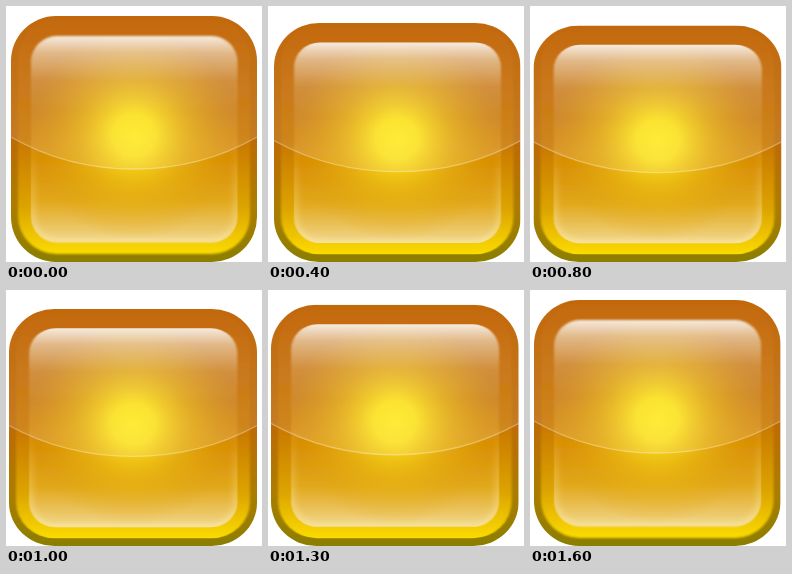
These frames come from a looping animation (256 px wide and 256 px high, 1700 ms). An HTML page:

```html
<!DOCTYPE html>
<html lang="en">
<head>
<meta charset="utf-8">
<title>Wobbling button</title>
<style>
  html, body { margin: 0; height: 100%; overflow: hidden; background: #fff; }
  svg { display: block; width: 100%; height: 100%; }
</style>
</head>
<body>
<svg viewBox="0 0 256 256">
  <defs>
    <linearGradient id="rim" x2="0" y2="1">
      <stop offset="0" stop-color="#c2680c"/>
      <stop offset=".5" stop-color="#bd6b06"/>
      <stop offset=".78" stop-color="#ab7d00"/>
      <stop offset="1" stop-color="#8b7e00"/>
    </linearGradient>
    <linearGradient id="bevel" x2="0" y2="1">
      <stop offset="0" stop-color="#c4690c"/>
      <stop offset=".5" stop-color="#c87604"/>
      <stop offset=".8" stop-color="#dca400"/>
      <stop offset="1" stop-color="#fbdb00"/>
    </linearGradient>
    <linearGradient id="panel" x2="0" y2="1">
      <stop offset="0" stop-color="#c4731a"/>
      <stop offset=".35" stop-color="#ca7c18"/>
      <stop offset=".6" stop-color="#d88e04"/>
      <stop offset=".8" stop-color="#e1a81c"/>
      <stop offset="1" stop-color="#f1d78c"/>
    </linearGradient>
    <radialGradient id="glow" gradientUnits="userSpaceOnUse" cx="128" cy="129" r="105">
      <stop offset="0" stop-color="#ffe820"/>
      <stop offset=".2" stop-color="#fbe01c"/>
      <stop offset=".55" stop-color="#ebba10" stop-opacity=".6"/>
      <stop offset="1" stop-color="#dfa008" stop-opacity="0"/>
    </radialGradient>
    <linearGradient id="shine" x2="0" y2="1">
      <stop offset="0" stop-color="#fff" stop-opacity=".85"/>
      <stop offset=".08" stop-color="#fff" stop-opacity=".48"/>
      <stop offset=".22" stop-color="#fff" stop-opacity=".12"/>
      <stop offset=".38" stop-color="#fff" stop-opacity="0"/>
    </linearGradient>
    <linearGradient id="gloss" x2="0" y2="1">
      <stop offset="0" stop-color="#fff" stop-opacity="0"/>
      <stop offset="1" stop-color="#fff" stop-opacity=".14"/>
    </linearGradient>
    <linearGradient id="edge" x2="0" y2="1">
      <stop offset=".5" stop-color="#ffe9a0" stop-opacity="0"/>
      <stop offset="1" stop-color="#ffefb0" stop-opacity=".5"/>
    </linearGradient>
    <filter id="soft"><feGaussianBlur stdDeviation=".8"/></filter>
    <filter id="softer"><feGaussianBlur stdDeviation="3"/></filter>
    <rect id="pane" x="25" y="30" width="206.5" height="206.5" rx="26"/>
    <clipPath id="body"><rect x="5" y="10" width="246" height="246" rx="45"/></clipPath>
    <clipPath id="inside"><use href="#pane"/></clipPath>
  </defs>
  <g id="button" clip-path="url(#body)">
    <rect x="5" y="10" width="246" height="246" fill="url(#rim)"/>
    <rect x="12" y="14" width="232" height="234" rx="38" fill="url(#bevel)" filter="url(#soft)"/>
    <use href="#pane" fill="url(#panel)" filter="url(#soft)"/>
    <g clip-path="url(#inside)">
      <use href="#pane" fill="url(#glow)"/>
      <use href="#pane" fill="none" stroke="url(#edge)" stroke-width="8" filter="url(#softer)"/>
    </g>
    <use href="#pane" fill="url(#shine)" filter="url(#soft)"/>
    <path d="M5 10H251V131.5Q195 163.5 128 163.5T5 131.5Z" fill="url(#gloss)"/>
    <path d="M5 131Q61 163 128 163T251 131" fill="none" stroke="#fff" stroke-opacity=".28" stroke-width="1.4"/>
  </g>
</svg>
<script>
  const LOOP = 1700, STEP = 100, BOTTOM = 256, SIZE = 246;
  const button = document.getElementById("button");

  // [time, left, right, top]
  const poses = [
    [0, 5, 251, 10], [200, 6, 252, 15], [400, 6, 252.5, 17], [600, 4, 252, 20],
    [1000, 3, 251, 19], [1300, 3, 250.7, 14.7], [1600, 4, 250.6, 10], [1700, 5, 251, 10]
  ];

  function poseAt(time) {
    const next = poses.findIndex(pose => pose[0] > time);
    const a = poses[next - 1], b = poses[next];
    const k = (time - a[0]) / (b[0] - a[0]);
    return [1, 2, 3].map(i => a[i] + (b[i] - a[i]) * k);
  }

  function draw() {
    const time = Math.floor(performance.now() % LOOP / STEP) * STEP;
    const [left, right, top] = poseAt(time);
    const sx = (right - left) / SIZE, sy = (BOTTOM - top) / SIZE;
    button.setAttribute("transform",
      `translate(${left - 5 * sx} ${BOTTOM * (1 - sy)}) scale(${sx} ${sy})`);
    requestAnimationFrame(draw);
  }
  draw();
</script>
</body>
</html>
```
